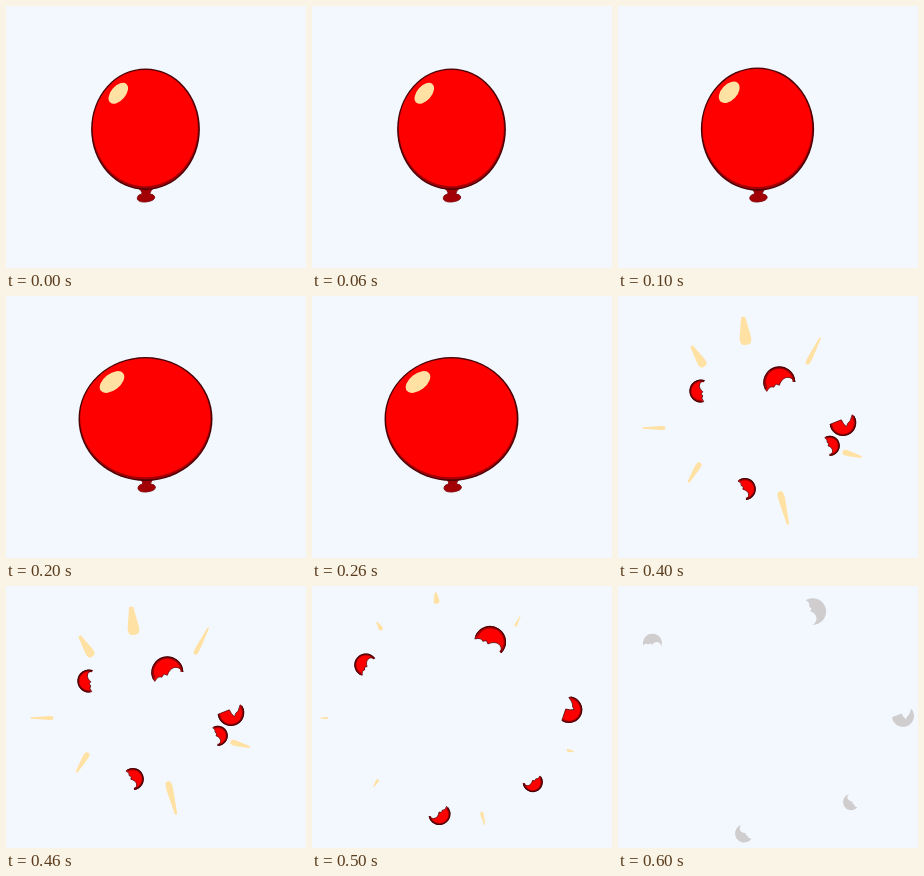
An HTML page for the animation above (700 ms loop, 300 px wide and 262 px high).

```html
<!DOCTYPE html>
<html lang="en">
<head>
<meta charset="utf-8">
<title>Balloon pop</title>
<style>
  html, body { margin: 0; width: 100%; height: 100%; overflow: hidden; background: #f3f8ff; }
  svg { display: block; width: 100%; height: 100%; }
</style>
</head>
<body>
<svg id="stage" viewBox="0 0 300 262"></svg>
<script>
const STEP = 100, STEPS = 7, BURST = 3, LAST = STEPS - 1 - BURST;
const INK = '#4b0004', SHADE = '#a00005', RED = '#fe0000', CREAM = '#ffe1a3', GREY = '#cfcdcd';
const stage = document.getElementById('stage');

const path = (d, fill, more = '') => `<path d="${d}" fill="${fill}" ${more}/>`;
const oval = (x, y, rx, ry, fill, more = '') =>
  `<ellipse cx="${x}" cy="${y}" rx="${rx}" ry="${ry}" fill="${fill}" ${more}/>`;
const line = (color, width) => `stroke="${color}" stroke-width="${width}" stroke-linejoin="round"`;
const mix = (a, b, t) => a + (b - a) * t;

// Point on a Bezier curve of any degree.
function along(points, t) {
  if (points.length === 1) return points[0];
  return along(points.slice(1).map(([x, y], i) => [mix(points[i][0], x, t), mix(points[i][1], y, t)]), t);
}

// u runs from 0 to 1 while the balloon swells, slowly at first.
function balloon(u) {
  const swell = u ** 2.5, lift = Math.sqrt(u);
  const x = 139.5, y = 123.2 - 0.2 * lift;
  const rx = mix(54.4, 67, swell), ry = mix(60.8, 62, lift);
  const shineX = mix(112.3, 106, swell), shineY = mix(87.2, 86, lift);
  const knot = 'M-9 181 Q-3 185 -4 188 Q-9 189 -8.5 193 Q-7 196.5 0 196 ' +
    'Q9 195 9 191 Q8 188 4 188 Q4 185 9 181 Z';
  return path(knot, '#a30006', `transform="translate(${139.8 + 0.7 * lift})" ${line('#780004', 0.8)}`) +
    oval(x, y, rx, ry, INK) +
    oval(x, y, rx - 1.4, ry - 1.4, SHADE) +
    oval(x - 0.2, y - 1.1, rx - 1.9, ry - 2.6, RED) +
    oval(shineX, shineY, mix(12.3, 14.2, swell), mix(7.3, 8.2, lift), CREAM,
      `transform="rotate(${mix(-49, -38, swell)} ${shineX} ${shineY})"`);
}

function skin() {
  const top = 'M94 74 Q128 55 162 66 Q187 75 200 96 Q151 70 94 74 Z';
  const bottom = 'M80 152 Q102 184 138 184 Q172 182 190 164 Q134 177 80 152 Z';
  const edges = 'M96 73 Q128 56.5 162 67.3 Q186 76 198 94 M82 154 Q103 182.5 138 182.5 Q170 181 188 165';
  return path(top + bottom, RED) + path(edges, 'none', line(SHADE, 3)) +
    path(top + bottom, 'none', line(INK, 0.8));
}

// Torn pieces, drawn on a unit circle.
const RIM = 'M-.9 .45 A1 1 0 1 1 1 0';
const INNER_RIM = 'M-.8 .4 A.9 .9 0 1 1 .9 0';
const CRESCENT = RIM + ' C.75 -.45 .2 -.4 0 .2 L-.22 .12 L-.36 .32 Q-.6 .2 -.82 .58 Z';
const WEDGE = RIM + ' L.1 .25 Q0 -.1 -.25 -.32 L-.36 -.08 Q-.6 0 -.78 .55 Z';

// Each flies along its curve while turning; s counts steps since the burst.
const shards = [
  { r: 11, tear: CRESCENT, turn: s => 11.5 * s * s - 82, route: [[113, 94.5], [85, 107], [46, 78], [34.5, 57]] },
  { r: 9.5, tear: CRESCENT, turn: s => 82 * s + 10, route: [[149, 150], [258, 102], [200, 234], [233, 216]] },
  { r: 10.5, tear: CRESCENT, turn: s => 84 * s, route: [[123, 124], [129, 216], [128, 230], [126, 247.5]] },
  { r: 15.5, tear: CRESCENT, turn: s => 47 * s - 48, route: [[144.5, 116.5], [195, 25.5]] },
  { r: 12.8, tear: WEDGE, turn: s => 149 - 25 * Math.cos(Math.PI * s), route: [[161, 142], [250, 120], [250, 120], [285, 130]] }
];

function shard({ r, tear, turn, route }, s) {
  const [x, y] = along(route, s / LAST);
  const faded = s === LAST;
  const size = faded ? r * 0.86 : r;
  const art = faded ? path(tear, GREY)
    : path(tear, RED) + path(INNER_RIM, 'none', line(SHADE, 1.4 / r)) +
      path(tear, 'none', line(INK, 0.7 / r)) + path(RIM, 'none', line(INK, 1.1 / r));
  return `<g transform="translate(${x} ${y}) rotate(${turn(s)}) scale(${size})">${art}</g>`;
}

// Sparks one step after the burst: blunt end, heading in degrees, length, width.
const SPEED = 31;
const sparks = [
  [86, 70, -122, 24, 9],
  [128, 48, -96, 28, 12],
  [189, 68, -63, 30, 5],
  [47, 132, 180, 23, 4],
  [82, 167, 121, 23, 6],
  [162, 196, 76, 34, 7],
  [225, 156, 15, 20, 6]
];

function spark([x, y, heading, reach, width], s) {
  const shrunk = s === 2;
  const l = reach * (shrunk ? 0.4 : 1), w = width * (shrunk ? 0.5 : 1) / 2;
  const d = `M0 ${-w * 0.7} Q${l * 0.1} ${-w * 1.1} ${l * 0.3} ${-w * 0.9} ` +
    `L${l - 1} ${-w * 0.35} Q${l + 0.5} 0 ${l - 1} ${w * 0.35} ` +
    `L${l * 0.3} ${w * 0.9} Q${l * 0.1} ${w * 1.1} 0 ${w * 0.7} Q${-w * 0.35} 0 0 ${-w * 0.7} Z`;
  return path(d, CREAM, `transform="translate(${x} ${y}) rotate(${heading}) translate(${SPEED * (s - 1)})"`);
}

function scene(step) {
  if (step < BURST) return balloon(step / (BURST - 1));
  const s = step - BURST;
  return (s === 0 ? skin() : '') +
    shards.map(piece => shard(piece, s)).join('') +
    (s < LAST ? sparks.map(ray => spark(ray, s)).join('') : '');
}

let shown = -1;
const start = performance.now();
function draw(now) {
  const step = Math.floor(Math.max(0, now - start) / STEP) % STEPS;
  if (step !== shown) stage.innerHTML = scene(shown = step);
  requestAnimationFrame(draw);
}
draw(start);
</script>
</body>
</html>
```
